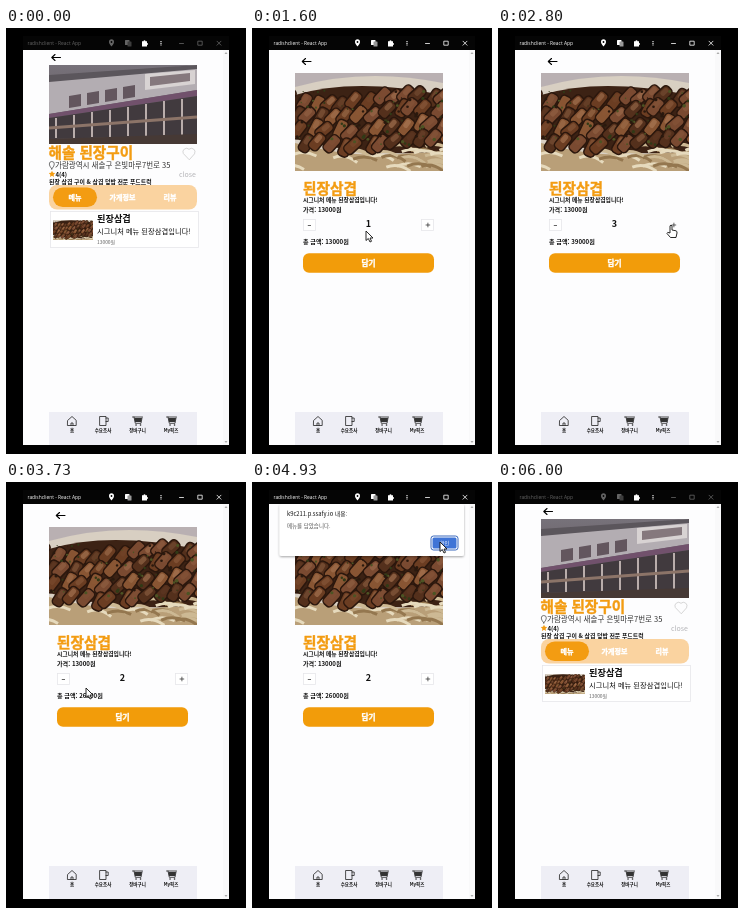
These frames come from a looping animation (240 px wide and 426 px high, 6.07 s). An HTML page:

```html
<!DOCTYPE html>
<html lang="ko">
<head>
<meta charset="utf-8">
<style>
  html, body { margin: 0; width: 100%; height: 100%; overflow: hidden; background: #000; }
  svg { display: block; width: 240px; height: 426px; }
  text { font-family: "Noto Sans CJK KR", "Noto Sans CJK", sans-serif; font-weight: 500; fill: #111; }
  .bold { font-weight: 700; }
  .heavy { font-weight: 900; stroke-width: .4; stroke-linejoin: round; }
  .orange { fill: #f39c12; }
  .heavy.orange { stroke: #f39c12; }
  .white { fill: #fff; }
  .heavy.white { stroke: #fff; }
  .mid { text-anchor: middle; }
  .line { fill: none; stroke: #222; stroke-width: .8; stroke-linecap: round; stroke-linejoin: round; }
  .box { fill: #fff; stroke: #e6e6ea; stroke-width: .8; }
  #bar .line { stroke: #fff; stroke-width: .8; }
  .dim .fade { opacity: .38; }
</style>
</head>
<body>
<svg viewBox="0 0 240 426">
  <defs>
    <symbol id="meat" viewBox="0 0 148 98" preserveAspectRatio="xMidYMid slice">
      <rect width="148" height="98" fill="#b9b0b2"/>
      <path d="M0 14Q70 -6 148 10V98H0Z" fill="#d8cfc2"/>
      <path d="M0 70Q80 92 148 74V98H0Z" fill="#b99f78"/>
      <path d="M0 22Q60 4 148 22V78Q80 86 0 66Z" fill="#3c2214"/>
      <g id="slices"></g>
    </symbol>
    <linearGradient id="wall" x2="0" y2="1">
      <stop stop-color="#77727a"/><stop offset="1" stop-color="#5a5156"/>
    </linearGradient>
    <g id="back"><path class="line" style="stroke:#000;stroke-width:1.1" d="M9.500 0H.8M4 -3L.8 0L4 3"/></g>
    <filter id="shadow" x="-10%" y="-10%" width="120%" height="130%">
      <feDropShadow dx="0" dy="1" stdDeviation="1.200" flood-opacity=".35"/>
    </filter>
  </defs>

  <rect width="240" height="426"/>
  <g id="bar">
    <rect x="17" y="8" width="206" height="14" fill="#050505"/>
    <g class="fade">
      <text class="white" x="21.500" y="17" font-size="4.900" style="font-family:'Open Sans',sans-serif">radishclient - React App</text>
      <path d="M105.500 18.500Q102.700 15.300 103 13.800A2.500 2.500 0 0 1 108 13.800Q108.300 15.300 105.500 18.500Z" fill="#fff"/>
      <circle cx="105.500" cy="14" r=".9"/>
      <rect x="119" y="12" width="4.500" height="5" rx=".6" fill="#fff"/>
      <rect x="121.500" y="13.500" width="4" height="5" rx=".6" fill="#999"/>
      <path class="line" d="M173.500 15.500H177.500M192.200 13.200H196.200V17.200H192.200ZM211 13.200L215 17.200M215 13.200L211 17.200"/>
    </g>
    <path d="M136 13.200H137.500A1 1 0 0 1 139.500 13.200H141V15A1 1 0 0 1 141 17V18.400H136Z" fill="#fff"/>
    <path d="M155 13V17.600" stroke="#fff" stroke-width="1.100" stroke-dasharray="1.100 .7"/>
  </g>
  <rect x="17" y="22" width="206" height="395" fill="#fdfdfe"/>
  <rect x="217" y="22" width="6" height="395" fill="#f9f9fa"/>
  <path d="M218.500 26L220 24L221.500 26ZM218.500 413L220 415L221.500 413Z" fill="#aaa"/>

  <g id="shop">
    <use href="#back" x="45" y="29.500"/>
    <svg x="43" y="37" width="148" height="79" viewBox="0 0 148 79">
      <rect width="148" height="79" fill="url(#wall)"/>
      <path d="M0 14L148 0V25L0 49Z" fill="#b3adb2"/>
      <path d="M0 10L148 0V4L0 17Z" fill="#5b565c"/>
      <path d="M20 31l12-2v12l-12 2zM38 28l12-2v12l-12 2zM56 25l12-2v12l-12 2zM74 22l12-2v12l-12 2z" fill="#63565e"/>
      <path d="M96 9L146 5V19L96 25Z" fill="#d8d3d3"/>
      <path d="M101 12L141 8V16L101 21Z" fill="#85787d"/>
      <path d="M0 49L148 25V31L0 53Z" fill="#71516c"/>
      <path d="M0 53L148 31V70L0 74Z" fill="#413a3e"/>
      <path d="M7 53V73M25 50V73M43 47V72M61 45V72M79 42V71M97 39V71M115 36V70M133 34V70" stroke="#b9adab" stroke-width="2"/>
      <path d="M0 63L148 52" stroke="#8c7468" stroke-width="3"/>
      <path d="M0 74L148 69V79H0Z" fill="#463935"/>
    </svg>
    <text class="heavy orange" x="42.500" y="130" font-size="14.600">해솔 된장구이</text>
    <path d="M183 131.500L177.300 125.500A3.600 3.600 0 0 1 183 121.300A3.600 3.600 0 0 1 188.700 125.500Z" class="line" style="stroke:#ccc"/>
    <path class="line" style="stroke:#555" d="M45.800 141Q43 137.500 43.300 136A2.500 2.500 0 0 1 48.300 136Q48.600 137.500 45.800 141Z"/>
    <text x="49" y="140" font-size="7.500" style="font-weight:400;fill:#333">가람광역시 새솔구 은빛마루7번로 35</text>
    <path class="orange" d="M46 142.700l1 2.100 2.200.3-1.600 1.600.4 2.200-2-1.100-2 1.100.4-2.200-1.600-1.600 2.200-.3z"/>
    <text class="bold" x="49.500" y="149" font-size="6">4(4)</text>
    <text x="190" y="149" font-size="7" text-anchor="end" style="fill:#b5b5b8">close</text>
    <text class="bold" x="43" y="155.500" font-size="5.900">된장 삼겹 구이 &amp; 삼겹 덮밥 전문 푸드트럭</text>
    <rect x="43" y="157" width="148" height="24.500" rx="8" fill="#fad3a0"/>
    <rect x="47" y="159.500" width="44" height="19.500" rx="9.700" fill="#f39c12"/>
    <g font-size="7">
      <text class="heavy white mid" x="69" y="171.500">메뉴</text>
      <text class="heavy white mid" x="116.500" y="171.500">가게정보</text>
      <text class="heavy white mid" x="164" y="171.500">리뷰</text>
    </g>
    <rect class="box" x="44.500" y="183.500" width="148" height="36"/>
    <use href="#meat" x="47" y="192" width="40" height="20"/>
    <text class="bold" x="91" y="194" font-size="9.200">된장삼겹</text>
    <text x="91" y="206" font-size="7.300">시그니처 메뉴 된장삼겹입니다!</text>
    <text x="91" y="216" font-size="4.900" style="fill:#666">13000원</text>
  </g>

  <g id="item">
    <use href="#back" x="49.500" y="33.500"/>
    <use href="#meat" x="43" y="45" width="148" height="98"/>
    <text class="heavy orange" x="51" y="165.500" font-size="14.700">된장삼겹</text>
    <text class="bold" x="51" y="173.500" font-size="5.800">시그니처 메뉴 된장삼겹입니다!</text>
    <text class="bold" x="51" y="184" font-size="6.100">가격: 13000원</text>
    <rect class="box" x="51.500" y="191.500" width="12" height="11"/>
    <rect class="box" x="169.500" y="191.500" width="12" height="11" id="plusBox"/>
    <path class="line" style="stroke-width:.7" d="M56.200 197.500H58.600M174 197H177.800M175.900 195.100V198.900"/>
    <text class="heavy mid" x="116.500" y="199.300" font-size="9" id="count"></text>
    <text class="bold" x="51" y="215.500" font-size="6.100" id="total"></text>
    <rect x="51" y="225.300" width="131" height="19.500" rx="6" fill="#f29c0a"/>
    <text class="heavy white mid" x="116.500" y="237.500" font-size="7.700">담기</text>
  </g>

  <rect x="43" y="384" width="148" height="33" fill="#eeeef5"/>
  <path class="line" d="M61.800 392.300L66 388.500L70.200 392.300V397.500H61.800ZM65 397.500V395H67V397.500M94 388.500H100V397.500H94ZM100 390H102.200V393.500H100"/>
  <g id="cart">
    <path class="line" d="M126.500 389H136.500M128 389L129.300 395.300H135L136 390"/>
    <path d="M128.300 390H136L135 394H129Z" fill="#333"/>
    <path d="M130 397h.1M134.500 397h.1" class="line" style="stroke-width:1.500"/>
  </g>
  <use href="#cart" x="34"/>
  <g font-size="4.500">
    <text class="bold mid" x="66" y="404">홈</text>
    <text class="bold mid" x="97" y="404">수요조사</text>
    <text class="bold mid" x="131.500" y="404">장바구니</text>
    <text class="bold mid" x="165" y="404">My픽즈</text>
  </g>

  <g id="alert">
    <rect x="27.500" y="22" width="184.500" height="52" rx="2" fill="#fff" filter="url(#shadow)"/>
    <text x="35" y="34" font-size="5.800">k9c211.p.ssafy.io 내용:</text>
    <text x="35" y="46" font-size="5.500" style="fill:#555">메뉴를 담았습니다.</text>
    <rect x="179" y="54" width="27" height="14" rx="2.500" fill="#fff" stroke="#2459b5" stroke-width=".9"/>
    <rect x="180.500" y="55.500" width="24" height="11" rx="1.500" fill="#3f74d6"/>
    <text class="white mid" x="192.500" y="63" font-size="5">확인</text>
  </g>

  <g id="cursor" fill="#fff" stroke="#111" stroke-width=".9" stroke-linejoin="round">
    <path id="arrow" d="M0 0V9.500L2.300 7.500L4 11L5.500 10.300L4 7H7Z"/>
    <path id="hand" d="M-1 .8Q0-.6 1 .8V5L5 5.800Q6.300 6.200 6 8L5 12.500H-.5L-4 8.500Q-4 6.500-1 8Z"/>
  </g>
</svg>
<script>
const LOOP = 6070, FPS = 15;
const $ = id => document.getElementById(id);
const show = (id, on) => $(id).style.display = on ? "" : "none";

// Sliced meat with glaze, herbs and pale onion strips
let seed = 7;
const rand = () => (seed = seed * 16807 % 2147483647) / 2147483647;
const pick = list => list[Math.floor(rand() * list.length)];
let slices = "";
for (let i = 0; i < 26; i++) {
  const x = rand() * 160 - 15, y = 72 + rand() * 24;
  slices += `<path d="M${x} ${y}q12 -5 24 ${rand() * 8}" fill="none" stroke="${pick(["#e6dabd", "#cdb994", "#94774f"])}" stroke-width="3"/>`;
}
for (let row = 0; row < 4; row++)
  for (let col = 0; col < 13; col++) {
    const x = col * 13 - 6 + row * 5 + rand() * 5;
    const y = 13 + row * 14 + 4 * Math.sin(col / 2) + rand() * 5;
    const tilt = `transform="rotate(${25 + rand() * 25} ${x} ${y})"`;
    slices += `<rect x="${x}" y="${y}" width="11" height="19" rx="4" ${tilt}
      fill="${pick(["#6b3d22", "#885533", "#54301c", "#7a4a31"])}" stroke="#2b170d" stroke-width="1.500"/>
      <rect x="${x + 2}" y="${y + 2}" width="5" height="9" rx="2" ${tilt} fill="#a97855" opacity="${rand() * .7}"/>`;
  }
for (let i = 0; i < 70; i++)
  slices += `<circle cx="${rand() * 148}" cy="${16 + rand() * 58}" r="${.5 + rand() * 1.3}" fill="${pick(["#4c5424", "#313a17", "#2a190e"])}"/>`;
$("slices").innerHTML = slices;

// Pointer stops: time, x, y
const stops = [
  [1050, 205, 150], [1270, 115, 203], [1600, 114, 203], [1730, 114, 203],
  [2070, 173, 197], [2870, 173, 197], [3200, 57, 197], [3470, 57, 197],
  [3733, 80, 206], [3950, 114, 234], [4300, 114, 234], [4750, 188, 60],
  [5100, 188, 60], [5470, 217, 16]
];
const focusStart = 1050, focusEnd = 5470;
const opened = 1400, closed = 5130, alertStart = 4270, alertEnd = 5070;
const countAt = t => t < 2260 ? 1 : t < 2600 ? 2 : t < 3390 ? 3 : 2;

const cardAreas = [[44, 183, 149, 37]];
const itemAreas = [[51, 191, 13, 12], [169, 191, 13, 12], [51, 225, 131, 20]];
const inside = (x, y) => ([l, t, w, h]) => x >= l && x <= l + w && y >= t && y <= t + h;

function pointerAt(t) {
  const found = stops.findIndex(s => s[0] > t);
  const i = found < 0 ? stops.length - 1 : Math.max(1, found);
  const [t0, x0, y0] = stops[i - 1], [t1, x1, y1] = stops[i];
  const p = Math.min(1, Math.max(0, (t - t0) / (t1 - t0)));
  const e = p * p * (3 - 2 * p);
  return [x0 + (x1 - x0) * e, y0 + (y1 - y0) * e];
}

function draw() {
  const now = performance.now() % LOOP;
  const t = Math.floor((now + 5) * FPS / 1000) * 1000 / FPS;
  const focused = t >= focusStart && t < focusEnd;
  const onItem = t >= opened && t < closed;
  const alerting = t >= alertStart && t < alertEnd;
  const [x, y] = pointerAt(t);
  const hit = inside(x, y);
  const hover = focused && !alerting && (onItem ? itemAreas : cardAreas).some(hit);

  $("bar").setAttribute("class", focused ? "" : "dim");
  show("shop", !onItem);
  show("item", onItem);
  show("alert", alerting);
  show("cursor", focused);
  show("hand", hover);
  show("arrow", !hover);
  show("plusBox", !hit(itemAreas[1]));
  $("cursor").setAttribute("transform", `translate(${x} ${y})`);
  $("count").textContent = countAt(t);
  $("total").textContent = `총 금액: ${countAt(t) * 13000}원`;
  requestAnimationFrame(draw);
}
draw();
</script>
</body>
</html>
```
